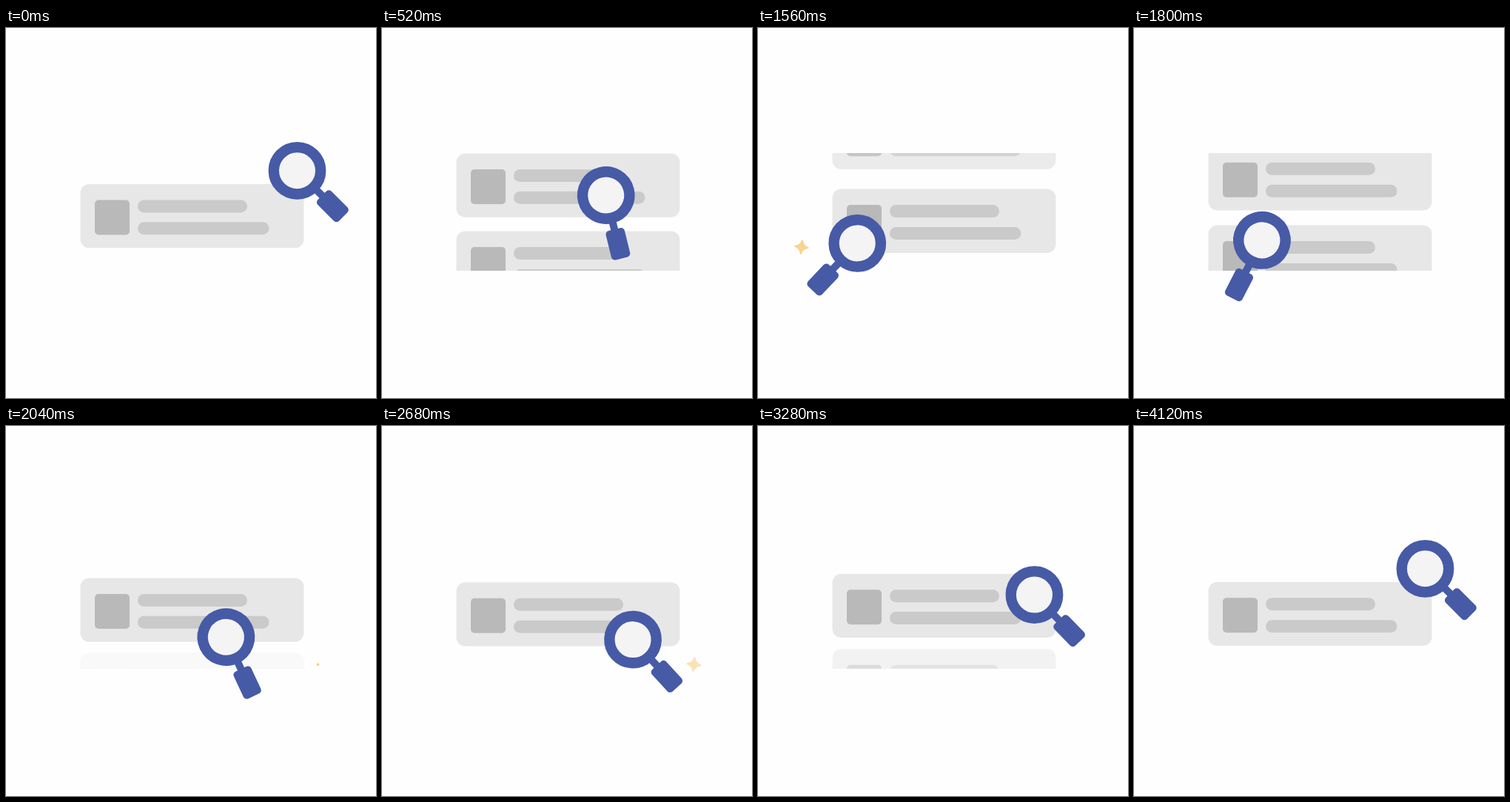
Write an HTML page that moves like this. It is 500 px wide and 500 px high and loops after 4.2 s.

```html
<!DOCTYPE html>
<html lang="en">
<head>
<meta charset="utf-8">
<title>Search</title>
<style>
  html, body { margin: 0; width: 100%; height: 100%; overflow: hidden; background: #fefefe; }
  svg { display: block; width: 100vw; height: 100vh; }
</style>
</head>
<body>
<svg viewBox="0 0 500 500">
  <defs>
    <clipPath id="list"><rect x="90" y="169" width="330" height="159"/></clipPath>
    <g id="card">
      <rect x="100.5" width="302" height="86.3" rx="12" fill="#e7e7e7"/>
      <rect x="120" y="21.5" width="47" height="47" rx="5" fill="#b9b9b9"/>
      <g fill="#cacaca">
        <rect x="178" y="21.5" width="148" height="17" rx="8.5"/>
        <rect x="178" y="51.4" width="177.5" height="17" rx="8.5"/>
      </g>
    </g>
    <path id="star" fill="#f5bb50" stroke="#f5bb50" stroke-width="2" stroke-linejoin="round"
      d="M0-9Q1.5-2 9 0Q2 1.5 0 9Q-1.5 2-9 0Q-2-1.5 0-9Z"/>
  </defs>
  <g clip-path="url(#list)">
    <use id="leaving" href="#card"/>
    <use id="entering" href="#card"/>
  </g>
  <use id="starLeft" href="#star"/>
  <use id="starRight" href="#star"/>
  <g id="glass">
    <g fill="#465aa6">
      <rect x="36" y="-5" width="16" height="10"/>
      <rect x="47.5" y="-13" width="40.5" height="26" rx="5"/>
    </g>
    <circle r="31.7" fill="#f4f4f4" stroke="#465aa6" stroke-width="14.4"/>
  </g>
</svg>
<script>
  const LOOP = 4200, STEP = 40;
  const REST = 210.8, ABOVE = 97, BELOW = 311;
  const el = id => document.getElementById(id);
  const mix = (a, b, p) => a + (b - a) * p;
  const span = (t, start, length) => Math.min(1, Math.max(0, (t - start) / length));
  const easeInOut = (u, n) => u < 0.5 ? (2 * u) ** n / 2 : 1 - (2 - 2 * u) ** n / 2;

  function put(id, transform, opacity = 1) {
    el(id).setAttribute("transform", transform);
    el(id).setAttribute("opacity", opacity);
  }

  // Three downward scrolls, each bringing in a card from above
  function drawCards(t) {
    const turn = Math.min(2, Math.floor((t + 203) / 1306));
    const u = span(t, turn * 1306 - 203, 1362);
    const p = easeInOut(u, 5);
    put("entering", `translate(0 ${mix(ABOVE, REST, p)})`, span(u, 0.206, 0.157));
    put("leaving", `translate(0 ${mix(REST, BELOW, p)})`, 1 - span(u, 0.557, 0.159));
  }

  // Home, lower left, lower right, home again
  function drawGlass(t) {
    const left = easeInOut(span(t, 120, 900), 3);
    const drift = easeInOut(span(t, 1000, 600), 2);
    const right = easeInOut(span(t, 1473, 900), 3);
    const home = easeInOut(span(t, 2605, 1230), 3);
    let x = mix(393.5, 135, left) - 1.5 * drift;
    let y = mix(192.8, 287.5, left) + 3.5 * drift;
    let angle = mix(45, 133.8, left);
    x = mix(mix(x, 339, right), 393.5, home);
    y = mix(mix(y, 288.7, right) - 24 * right * (1 - right), 192.8, home);
    angle = mix(mix(angle, 47.4, right), 45, home);
    put("glass", `translate(${x} ${y}) rotate(${angle})`);
  }

  function drawStar(id, x, y, age) {
    const grow = 1 - (1 - span(age, 0, 400)) ** 3;
    const opacity = age > 0 ? 1 - span(age, 473, 333) : 0;
    put(id, `translate(${x} ${y}) rotate(${mix(28, 7, grow)}) scale(${grow})`, opacity);
  }

  function draw(now) {
    const t = Math.min(LOOP - 2 * STEP, Math.floor(now % LOOP / STEP) * STEP);
    drawCards(t);
    drawGlass(t);
    drawStar("starLeft", 58.8, 296, t - 960);
    drawStar("starRight", 421.5, 322.3, t - 2010);
  }

  const start = performance.now();
  function tick() {
    draw(performance.now() - start);
    requestAnimationFrame(tick);
  }
  tick();
</script>
</body>
</html>
```
